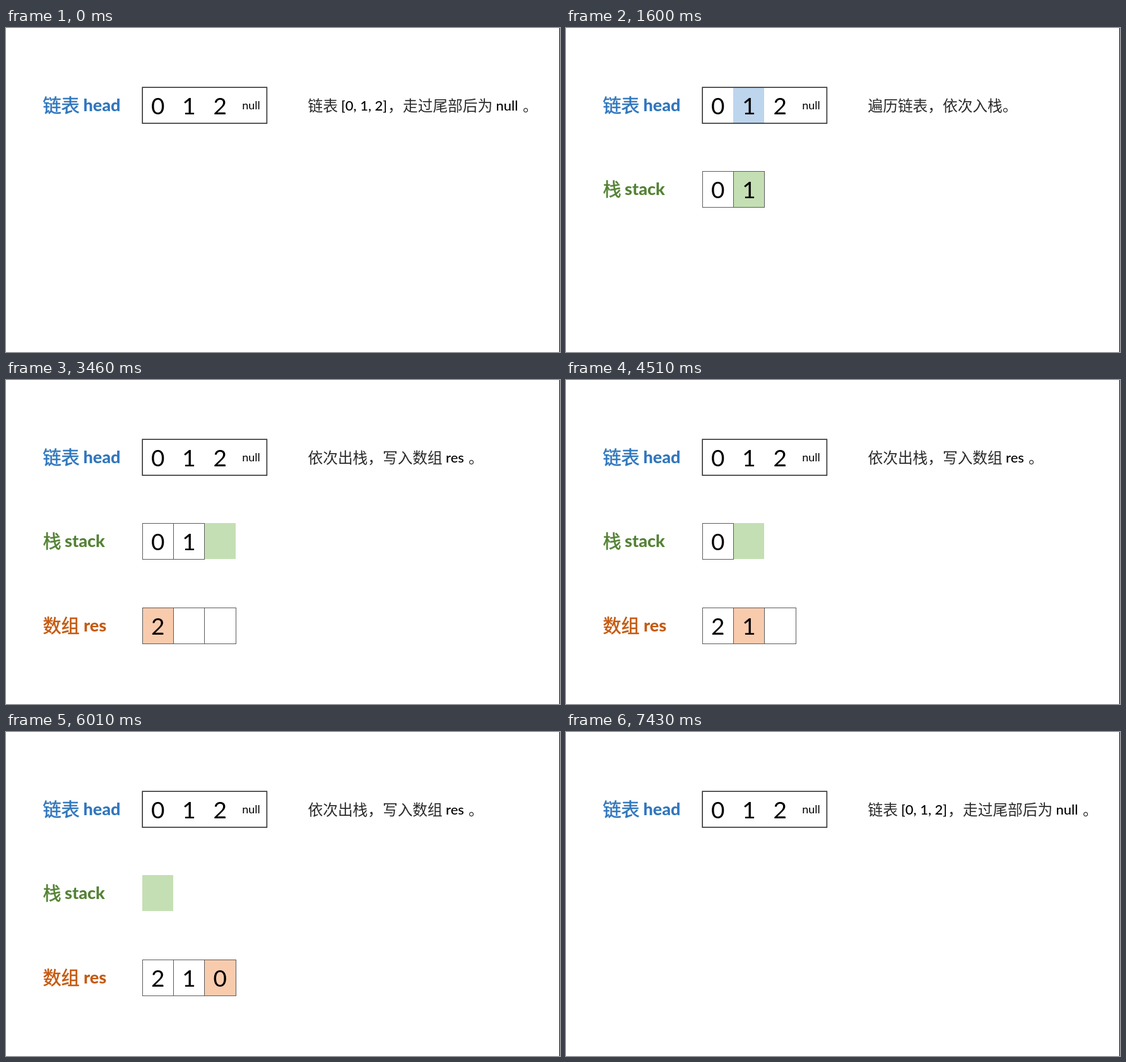
Animation of 878 by 514 pixels, one loop 8 s. Source, as an HTML page with a canvas:

```html
<!DOCTYPE html>
<html lang="zh-CN">
<head>
<meta charset="utf-8">
<title>链表 → 栈 → 数组</title>
<style>
  html, body { margin: 0; width: 100%; height: 100%; overflow: hidden; background: #fff; }
  canvas { display: block; }
</style>
</head>
<body>
<canvas id="stage" width="878" height="514"></canvas>
<script>
const ctx = document.getElementById("stage").getContext("2d");
const LOOP = 8000;
const LATIN = 'Lato, "Open Sans", sans-serif';
const HAN = '"Noto Sans CJK SC", "Noto Sans CJK", sans-serif';
const LEFT = 216, CELL = 49.3, HEIGHT = 57;
const ROW = { head: 94, stack: 227, res: 361 };
const BLUE = "#bdd5ed", GREEN = "#c5dfb4", ORANGE = "#f8cbad";

// Runs of a caption: [text, x, isHan]
const NOTES = {
  intro: [["链表", 478.5, 1], ["[0, 1, 2]", 531, 0], ["，", 605, 1],
          ["走过尾部后为", 629, 1], ["null", 776.5, 0], ["。", 819, 1]],
  push: [["遍历链表，依次入栈。", 478.5, 1]],
  pop: [["依次出栈，写入数组", 478.5, 1], ["res", 697, 0], ["。", 733, 1]],
  done: [["返回", 466, 1], ["[ 2 , 1 , 0 ]", 518.5, 0], ["即可。", 620.5, 1]]
};

// on = highlighted cell index; a stack index past the end is a popped cell
const STEPS = [
  { at: 0, note: "intro" },
  { at: 500, note: "push", headOn: 0, stack: "0", stackOn: 0 },
  { at: 1430, note: "push", headOn: 1, stack: "01", stackOn: 1 },
  { at: 2450, note: "push", headOn: 2, stack: "012", stackOn: 2 },
  { at: 2850, note: "push", stack: "012" },
  { at: 3460, note: "pop", stack: "01", stackOn: 2, res: "2  ", resOn: 0 },
  { at: 4470, note: "pop", stack: "0", stackOn: 1, res: "21 ", resOn: 1 },
  { at: 5450, note: "pop", stack: "", stackOn: 0, res: "210", resOn: 2 },
  { at: 6420, note: "done", stack: "", res: "210" },
  { at: 7430, note: "intro" }
];

const edge = i => LEFT + Math.floor(CELL * i + 0.2);

function text(str, x, y, font, color = "#000", align = "left") {
  ctx.font = font;
  ctx.fillStyle = color;
  ctx.textAlign = align;
  ctx.fillText(str, x, y);
}

// The Han part is a regular face thickened to semi-bold
function label(han, latin, x, top, color) {
  text(han, 58.5, top + 40, `400 29px ${HAN}`, color);
  ctx.strokeStyle = color;
  ctx.lineWidth = 0.6;
  ctx.strokeText(han, 58.5, top + 40);
  text(latin, x, top + 38, `800 27px ${LATIN}`, color);
}

function fillCell(i, top, color) {
  if (i === undefined) return;
  ctx.fillStyle = color;
  ctx.fillRect(edge(i), top, edge(i + 1) - edge(i), HEIGHT);
}

function digits(str, top) {
  [...str].forEach((d, i) =>
    text(d, LEFT + CELL * (i + 0.5), top + 43, `400 37px ${LATIN}`, "#000", "center"));
}

function cells(str, top, on, color) {
  fillCell(on, top, color);
  ctx.strokeStyle = "#5c5c5c";
  ctx.lineWidth = 1;
  for (let i = 0; i < str.length; i++)
    ctx.strokeRect(edge(i) + 0.5, top + 0.5, edge(i + 1) - edge(i), HEIGHT);
  digits(str, top);
}

function note(name) {
  const top = name === "done" ? ROW.res : ROW.head;
  for (const [str, x, han] of NOTES[name])
    if (han) text(str, x, top + 38, `300 23.7px ${HAN}`, "#2a2a2a");
    else text(str, x, top + 37, `500 22px ${LATIN}`);
}

function draw(t) {
  const s = STEPS.findLast(step => step.at <= t);
  ctx.fillStyle = "#fff";
  ctx.fillRect(0, 0, 878, 514);
  ctx.fillStyle = "#000";
  ctx.fillRect(877, 0, 1, 514);

  label("链表", "head", 122.5, ROW.head, "#3077bd");
  fillCell(s.headOn, ROW.head, BLUE);
  ctx.strokeStyle = "#333";
  ctx.lineWidth = 1.6;
  ctx.strokeRect(LEFT + 0.2, ROW.head + 0.2, CELL * 4, HEIGHT);
  digits("012", ROW.head);
  text("null", 388.5, ROW.head + 35, `400 18px ${LATIN}`, "#000", "center");

  if (s.stack !== undefined) {
    label("栈", "stack", 93, ROW.stack, "#548235");
    cells(s.stack, ROW.stack, s.stackOn, GREEN);
  }
  if (s.res) {
    label("数组", "res", 123, ROW.res, "#c55a11");
    cells(s.res, ROW.res, s.resOn, ORANGE);
  }
  note(s.note);
}

const start = performance.now();
function tick() {
  draw((performance.now() - start) % LOOP);
  requestAnimationFrame(tick);
}
tick();
</script>
</body>
</html>
```
